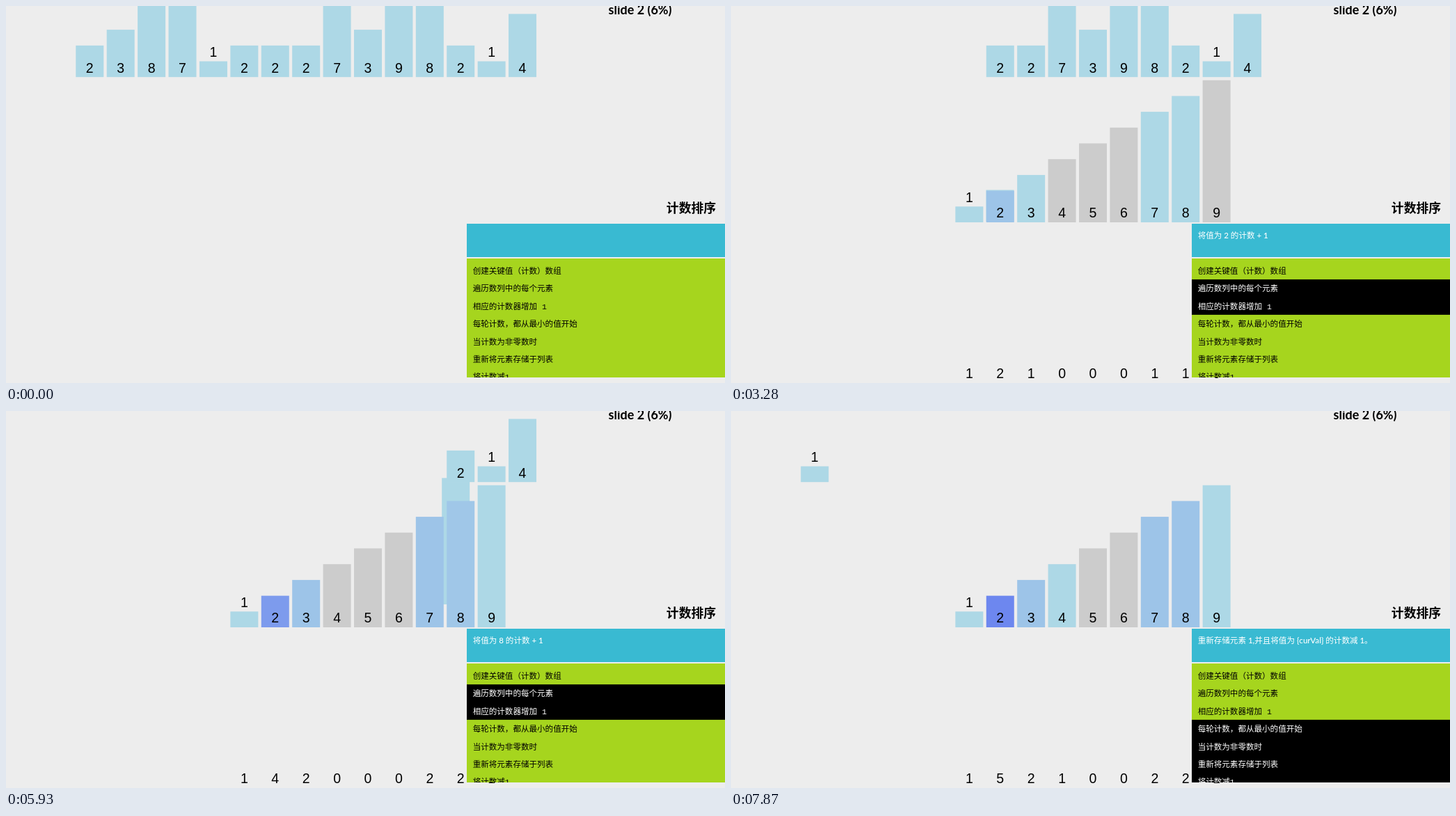
Animation of 1033 by 542 pixels, one loop 8000 ms. Source, as an HTML page:

```html
<!DOCTYPE html>
<html lang="zh-CN">
<head>
<meta charset="utf-8">
<title>计数排序</title>
<style>
  html, body { margin: 0; width: 100%; height: 100%; overflow: hidden; background: #ededed; }
  svg { display: block; }
  .num { font: 19.5px "Liberation Sans", Arial, sans-serif; text-anchor: middle; }
  .head { font: bold 17.8px Lato, "Noto Sans CJK SC", sans-serif; }
  .status { font: 500 11.55px Lato, "Noto Sans CJK SC", sans-serif; fill: #fff; }
  .row { font: 500 11.55px "Liberation Mono", "Noto Sans CJK SC", monospace; }
</style>
</head>
<body>
<svg id="stage" width="1033" height="542" viewBox="0 0 1033 542">
  <clipPath id="codeClip"><rect x="662" y="363" width="371" height="171"/></clipPath>
  <text class="head" style="font-size:18px" x="865.5" y="12.3">slide 2 (6%)</text>
  <text class="head" x="1020" y="297" text-anchor="end">计数排序</text>
  <g id="bars"></g>
  <g id="buckets"></g>
  <g id="counts"></g>
  <rect x="662" y="313" width="371" height="48" fill="#39bad2"/>
  <text id="status" class="status" x="670.7" y="334.2"></text>
  <g id="code" clip-path="url(#codeClip)">
    <rect x="662" y="363" width="371" height="171" fill="#a6d51e"/>
    <rect id="mark" x="662" width="371"/>
  </g>
</svg>
<script>
const LOOP = 8000, START = 781, PERIOD = 452, MOVE = 270;
const VALUES = [2, 3, 8, 7, 1, 2, 2, 2, 7, 3, 9, 8, 2, 1, 4];
const ROWS = [
  '创建关键值（计数）数组', '遍历数列中的每个元素', '相应的计数器增加 1',
  '每轮计数，都从最小的值开始', '当计数为非零数时', '重新将元素存储于列表', '将计数减1'
];
const LEFT = 100.3, PITCH = 44.41, WIDTH = 40, UNIT = 22.7;
const TOP_BASE = 102.2, LOW_BASE = 311, ROW_TOP = 367.7, ROW_H = 25.4;
const GREY = [204, 204, 204], LIGHT = [173, 216, 230], DEEP = [109, 135, 239];

const $ = id => document.getElementById(id);
const slotX = i => LEFT + PITCH * i;
const bucketX = v => slotX(v + 4);
const mix = (a, b, k) => a + (b - a) * k;
const ease = p => p < .5 ? 4 * p ** 3 : 1 - 4 * (1 - p) ** 3;
const startOf = step => START + PERIOD * step;
const progress = (t, step) => Math.min(1, Math.max(0, (t - startOf(step)) / MOVE));
const rgb = (a, b, k) => `rgb(${a.map((c, i) => Math.round(mix(c, b[i], k)))})`;
const shade = n => n < 1 ? rgb(GREY, LIGHT, n) : rgb(LIGHT, DEEP, (n - 1) / 4);

function add(parent, tag, attrs, text = '') {
  const el = document.createElementNS('http://www.w3.org/2000/svg', tag);
  for (const k in attrs) el.setAttribute(k, attrs[k]);
  el.textContent = text;
  return parent.appendChild(el);
}

// The group's zero point is the bar's bottom left corner.
function makeBar(parent, v) {
  const g = add(parent, 'g', {});
  const rect = add(g, 'rect', { y: -UNIT * v, width: WIDTH, height: UNIT * v, fill: rgb(LIGHT, LIGHT, 0) });
  add(g, 'text', { class: 'num', x: WIDTH / 2, y: v === 1 ? -29.3 : -6.6 }, v);
  return { g, rect, v };
}

function place(bar, x, y) {
  bar.g.setAttribute('transform', `translate(${x} ${y})`);
}

function show(el, on) {
  el.setAttribute('visibility', on ? 'visible' : 'hidden');
}

const bars = VALUES.map(v => makeBar($('bars'), v));
const restored = makeBar($('bars'), 1);
const buckets = [1, 2, 3, 4, 5, 6, 7, 8, 9].map(v => {
  const b = makeBar($('buckets'), v);
  place(b, bucketX(v), LOW_BASE);
  b.count = add($('counts'), 'text', { class: 'num', x: bucketX(v) + WIDTH / 2, y: 535 });
  return b;
});
const rows = ROWS.map((s, i) =>
  add($('code'), 'text', { class: 'row', x: 670.7, y: 384.9 + ROW_H * i }, s));

function statusAt(step) {
  if (step < -1) return '';
  if (step < 0) return ROWS[0];
  if (step < VALUES.length) return `将值为 ${VALUES[step]} 的计数 + 1`;
  return '重新存储元素 1,并且将值为 {curVal} 的计数减 1。';
}

function markedRows(step) {
  if (step < -1) return [0, 0];
  if (step < 0) return [0, 1];
  return step < VALUES.length ? [1, 3] : [3, 7];
}

function draw(t) {
  const last = VALUES.length;
  const step = Math.min(last, Math.floor((t - START) / PERIOD));

  bars.forEach((b, i) => {
    const p = progress(t, i), k = ease(p);
    show(b.g, p < 1);
    place(b, mix(slotX(i), bucketX(b.v), k), mix(TOP_BASE, LOW_BASE, k));
  });

  const back = ease(progress(t, last));
  show(restored.g, step >= last);
  place(restored, mix(bucketX(1), slotX(0), back), mix(LOW_BASE, TOP_BASE, back));

  const grow = ease(progress(t, -1));
  buckets.forEach(b => {
    let count = 0, level = 0;
    VALUES.forEach((v, i) => {
      if (v !== b.v) return;
      if (i <= step) count++;
      level += ease(progress(t, i));
    });
    if (b.v === 1 && step >= last) { count--; level -= back; }
    show(b.g, step >= -1);
    show(b.count, step >= -1);
    b.count.textContent = count;
    b.rect.setAttribute('width', WIDTH * grow);
    b.rect.setAttribute('height', UNIT * b.v * grow);
    b.rect.setAttribute('fill', grow < 1 ? rgb([0, 0, 0], GREY, grow) : shade(level));
  });

  $('status').textContent = statusAt(step);
  const [from, to] = markedRows(step);
  $('mark').setAttribute('y', ROW_TOP + ROW_H * from);
  $('mark').setAttribute('height', ROW_H * (to - from));
  rows.forEach((r, i) => r.setAttribute('fill', i >= from && i < to ? '#fff' : '#000'));
}

const began = performance.now();
function tick() {
  draw((performance.now() - began) % LOOP);
  requestAnimationFrame(tick);
}
tick();
</script>
</body>
</html>
```
